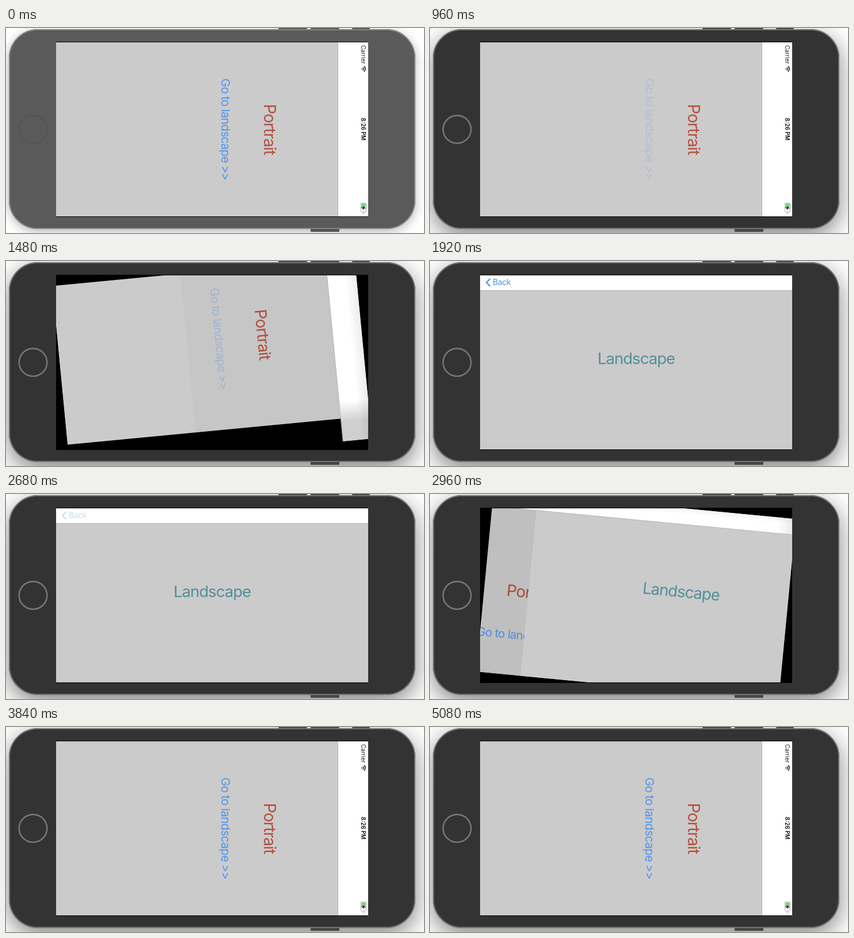
Animation of 726 by 358 pixels, one loop 5.12 s. Source, as an HTML page with a canvas:

```html
<!DOCTYPE html>
<html lang="en">
<head>
<meta charset="utf-8">
<title>Portrait and landscape</title>
<style>
  html, body { margin: 0; width: 726px; height: 358px; overflow: hidden; background: #fff; }
  canvas { display: block; }
</style>
</head>
<body>
<canvas id="stage" width="726" height="358"></canvas>
<script>
const ctx = document.getElementById('stage').getContext('2d');
const LOOP = 5120, STEP = 40;
const ACTIVE = 960, PUSH = 1438, BACK_DOWN = 2680, POP = 2918, TURN = 280;
const LONG = 542, SHORT = 304;
const GRAY = '#cbcbcb', RED = '#b4503f', BLUE = '#4f94f0', TEAL = '#548f99', BACK = '#4c96d7';

const lerp = (a, b, k) => a + (b - a) * k;
const smooth = x => { x = Math.min(1, Math.max(0, x)); return x * x * (3 - 2 * x); };

// Critically damped spring that settles at 1
function spring(ms, rate) {
  if (ms <= 0) return 0;
  const x = ms * rate / 1000, p = 1 - (1 + x) * Math.exp(-x);
  return p > 0.985 ? 1 : p;
}

function box(x, y, w, h, fill) {
  ctx.fillStyle = fill;
  ctx.fillRect(x, y, w, h);
}

function roundBox(x, y, w, h, r) {
  ctx.beginPath();
  ctx.roundRect(x, y, w, h, r);
}

function clipTo(x, y, w, h) {
  ctx.beginPath();
  ctx.rect(x, y, w, h);
  ctx.clip();
}

function line(points, color, width) {
  ctx.beginPath();
  points.forEach(([x, y]) => ctx.lineTo(x, y));
  ctx.strokeStyle = color;
  ctx.lineWidth = width;
  ctx.stroke();
}

function gradient(x0, y0, x1, y1, from, to) {
  const fill = ctx.createLinearGradient(x0, y0, x1, y1);
  fill.addColorStop(0, from);
  fill.addColorStop(1, to);
  return fill;
}

function text(str, x, y, size, color, { align = 'center', spacing = 0, weight = 400 } = {}) {
  ctx.font = `${weight} ${size}px Inter, sans-serif`;
  ctx.letterSpacing = spacing * size + 'px';
  ctx.textAlign = align;
  ctx.fillStyle = color;
  ctx.fillText(str, x, y);
}

function withAlpha(alpha, draw) {
  if (alpha <= 0) return;
  ctx.save();
  ctx.globalAlpha = alpha;
  draw();
  ctx.restore();
}

function device(active) {
  box(0, 0, 726, 358, '#fff');
  const body = active ? '#333' : '#5a5a5a';
  ctx.save();
  ctx.shadowColor = active ? 'rgba(0,0,0,.5)' : 'rgba(0,0,0,.3)';
  ctx.shadowBlur = active ? 40 : 18;
  ctx.shadowOffsetY = active ? 12 : 4;
  ctx.fillStyle = body;
  roundBox(5, 2, 706, 349, 50);
  ctx.fill();
  ctx.restore();

  const key = active ? '#484848' : '#555';
  [[473, 0, 50], [529, 0, 50], [601, 0, 31], [529, 350, 50]].forEach(([x, y, w]) => {
    ctx.fillStyle = key;
    roundBox(x, y, w, 6, 1.5);
    ctx.fill();
  });

  ctx.fillStyle = body;
  ctx.strokeStyle = active ? '#747474' : '#858585';
  ctx.lineWidth = 2;
  roundBox(6, 3, 704, 347, 49);
  ctx.fill();
  ctx.stroke();

  ctx.beginPath();
  ctx.arc(47, 177, 24.3, 0, 7);
  ctx.strokeStyle = active ? '#787878' : '#515151';
  ctx.lineWidth = active ? 2.5 : 1.4;
  ctx.stroke();
  box(87, 24, LONG, 306, '#000');
}

function statusBar() {
  text('Carrier', 5, 12.5, 10, '#222', { align: 'left' });
  text('8:26 PM', 151.5, 12.5, 9.75, '#111', { weight: 600 });
  ctx.strokeStyle = '#111';
  ctx.lineWidth = 1.5;
  [1, 4, 7].forEach(r => {
    ctx.beginPath();
    ctx.arc(46.5, 12, r, -Math.PI * 0.75, -Math.PI * 0.25);
    ctx.stroke();
  });
  ctx.strokeStyle = '#999';
  ctx.lineWidth = 0.8;
  roundBox(280.5, 3.5, 16, 9, 2);
  ctx.stroke();
  box(298, 6.5, 1.2, 3, '#999');
  box(281.5, 4.5, 7, 7, '#72d572');
  ctx.beginPath();
  [[291, 3.5], [286, 8.8], [289, 8.8], [287.5, 13], [292.5, 7.4], [289.5, 7.4]]
    .forEach(([x, y]) => ctx.lineTo(x, y));
  ctx.fillStyle = '#111';
  ctx.fill();
}

function portraitPage(x, width, height, center, dim, dimHeight, linkAlpha) {
  box(x, 0, width, height, GRAY);
  text('Portrait', x + center, 181.5, 28, RED, { spacing: -0.037 });
  withAlpha(linkAlpha, () =>
    text('Go to landscape >>', x + center, 255, 20.6, BLUE, { spacing: -0.037 }));
  box(x, 0, width, dimHeight, `rgba(0,0,0,${dim})`);
}

function landscapePage(x, width, height) {
  box(x, 0, width, height, GRAY);
  text('Landscape', x + width / 2, 155, 27.6, TEAL, { spacing: -0.037 });
}

function navBar(width, height, edge, shown, backAlpha) {
  // The blurred bar picks up the dark behind it while pages move
  const haze = shown * (1 - shown);
  box(0, 0, width, height, '#fff');
  box(0, 0, width, height, gradient(edge - 30, 0, edge + 6, 0, 'rgba(0,0,0,0)', `rgba(0,0,0,${haze})`));
  box(0, 0, width, height, gradient(0, 0, 0, height * 0.4, `rgba(0,0,0,${haze * 0.4})`, 'rgba(0,0,0,0)'));
  box(0, height, width, 0.8, '#b0b0b0');
  withAlpha(1 - 4 * shown, statusBar);
  withAlpha(backAlpha, () => {
    line([[17.5, 6], [11, 12.5], [17.5, 19]], BACK, 2.2);
    text('Back', 22, 17, 13.8, BACK, { align: 'left', spacing: -0.02 });
  });
}

function render(t) {
  const popping = t >= POP;
  const upright = 1 - smooth((t - PUSH) / TURN) + smooth((t - POP) / TURN);
  const shown = popping ? 1 - spring(t - POP - 4, 17.4) : spring(t - PUSH, 23);
  const w = lerp(LONG, SHORT, upright), h = lerp(SHORT, LONG, upright);

  device(t >= ACTIVE);
  ctx.save();
  clipTo(87, 25, LONG, SHORT);
  ctx.translate(358, 177);
  ctx.rotate(upright * Math.PI / 2);
  ctx.translate(-w / 2, -h / 2);
  clipTo(0, 0, w, h);

  const pageX = shown * (popping ? -80 : -159);
  const pageW = popping ? w + 80 * shown : w;
  const pressed = t >= ACTIVE && !popping;
  if (shown < 1) {
    portraitPage(pageX, pageW, h, popping ? SHORT / 2 : w / 2,
      shown * (popping ? 0.07 : 0.1), popping ? h : Math.min(h, SHORT),
      pressed ? 0.2 + 0.5 * shown : 1);
  }
  if (shown > 0) landscapePage(LONG * (1 - shown), w, h);

  const backAlpha = popping ? 0.3 * (2 * shown - 1) : t >= BACK_DOWN ? 0.3 : 2 * shown - 1;
  navBar(w, lerp(26, 52, upright), pageX + pageW, shown, backAlpha);
  ctx.restore();
}

function tick() {
  render(Math.floor(performance.now() % LOOP / STEP) * STEP);
  requestAnimationFrame(tick);
}
tick();
</script>
</body>
</html>
```
